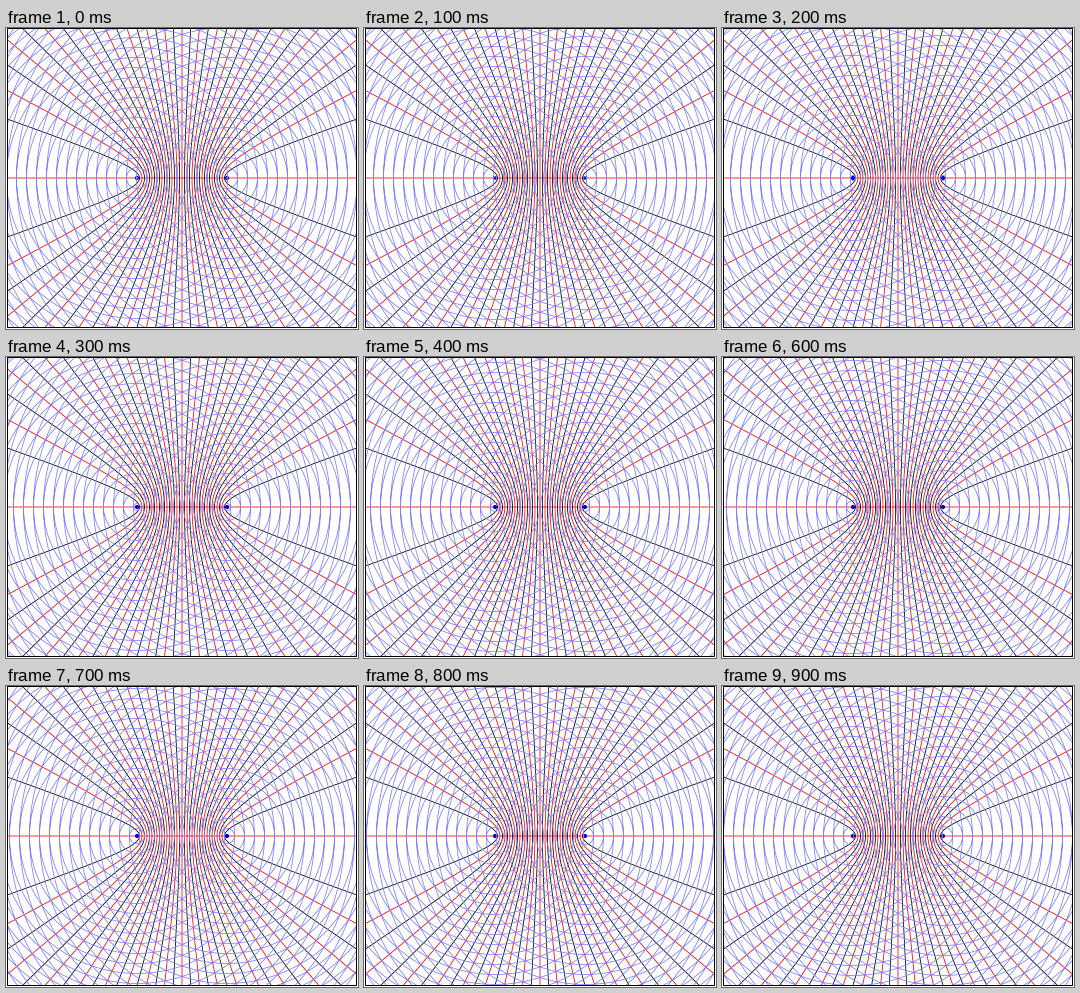
These frames come from a looping animation (352x301 px, 1 s). A matplotlib script:

```python
import matplotlib
import matplotlib.pyplot as plt
import numpy as np
from matplotlib.animation import FuncAnimation
from matplotlib.patches import Circle, Rectangle

matplotlib.rcParams["toolbar"] = "None"

WIDTH, HEIGHT, DPI = 352, 301, 64
PX = 72 / DPI
CX, CY = 176, 150
HALF_GAP = 45
WAVELENGTH = 10
STEPS = 10
SOURCES = (CX - HALF_GAP, CX + HALF_GAP)
RED, BLACK, BLUE, WAVE = "#ff0000", "#000000", "#0000e0", "#8080ff"

fig = plt.figure(figsize=(WIDTH / DPI, HEIGHT / DPI), dpi=DPI, facecolor="white")
ax = fig.add_axes([0, 0, 1, 1])
ax.set_xlim(0, WIDTH)
ax.set_ylim(HEIGHT, 0)
ax.axis("off")

view = Rectangle((1, 0), 350, 300, fill=False, ec="none")
ax.add_patch(view)
ax.add_patch(Rectangle((1.5, 0.5), 349, 299, fill=False, ec=BLACK, lw=PX,
                       snap=False, zorder=6))


def curve(x, y, color, zorder=2):
    # Snapping would move straight lines off their true position
    line, = ax.plot(x, y, color=color, lw=0.8 * PX, snap=False, zorder=zorder)
    line.set_clip_path(view)
    return line


def hyperbola(path_difference, color):
    a = path_difference / 2
    b = np.sqrt(HALF_GAP**2 - a**2)
    y = np.linspace(-150, 150, 601)
    x = a * np.sqrt(1 + (y / b) ** 2)
    for side in (-1, 1):
        curve(CX + side * x, CY + y, color)


# Degenerate cases of maximal and zero path difference
curve([1, 351], [CY, CY], RED)
curve([CX, CX], [0, 300], RED)

for half_waves in range(1, 4 * HALF_GAP // WAVELENGTH):
    hyperbola(half_waves * WAVELENGTH / 2, BLACK if half_waves % 2 else RED)

for sx in SOURCES:
    ax.add_patch(Circle((sx, CY), 2.1, fc=BLUE, ec="none", zorder=3))

waves = curve([], [], WAVE, zorder=4)
angle = np.append(np.linspace(0, 2 * np.pi, 181), np.nan)


def update(step):
    radii = WAVELENGTH * (np.arange(28) + (step + 0.5) / STEPS)
    x = np.outer(radii, np.cos(angle)).ravel()
    y = np.outer(radii, np.sin(angle)).ravel()
    waves.set_data(np.concatenate([sx + x for sx in SOURCES]),
                   np.tile(CY + y, len(SOURCES)))
    return (waves,)


anim = FuncAnimation(fig, update, frames=STEPS, interval=100,
                     repeat=True, repeat_delay=0, blit=False)
plt.show()
```
